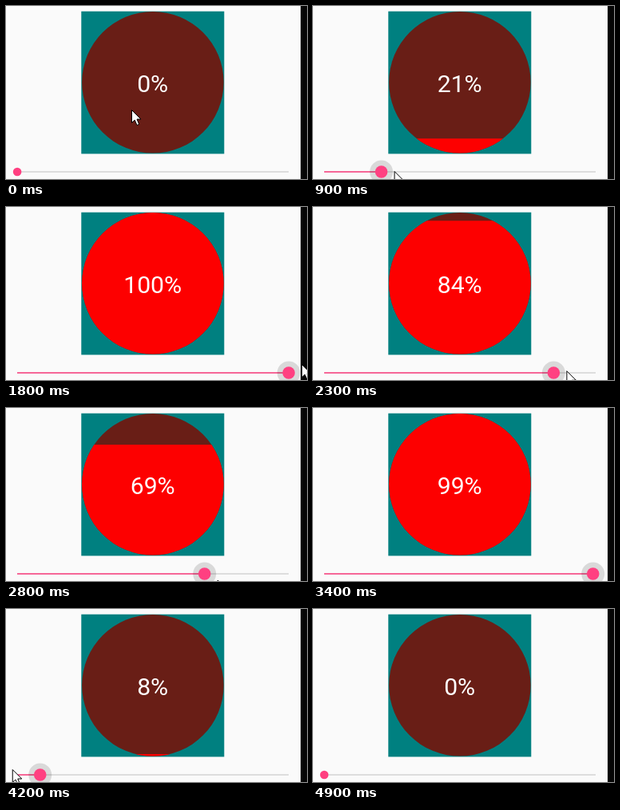
An HTML page for the animation above (5.2 s loop, 377x217 px).

```html
<!DOCTYPE html>
<html lang="en">
<head>
<meta charset="utf-8">
<title>Circular fill slider</title>
<style>
  html, body { margin: 0; width: 100%; height: 100%; overflow: hidden; background: #fafafa; }
  svg { display: block; width: 377px; height: 217px; }
  text { font: 30.2px Roboto, sans-serif; fill: #fff; text-anchor: middle; }
</style>
</head>
<body>
<svg viewBox="0 0 377 217">
  <clipPath id="fill"><rect id="level" x="94" width="180" height="180"/></clipPath>
  <rect width="377" height="217" fill="#fafafa"/>
  <rect x="369" width="8" height="217" fill="#050505"/>
  <rect x="94.3" y="6.7" width="179" height="178.7" fill="#008080"/>
  <circle cx="183.9" cy="95.8" r="88.8" fill="#691e16"/>
  <circle cx="183.9" cy="95.8" r="88.8" fill="#fd0000" clip-path="url(#fill)"/>
  <text id="label" x="183.7" y="107.8"></text>
  <path d="M14 208H354" stroke="#d3d3d3" stroke-width="1.5"/>
  <path id="track" stroke="#ff4081" stroke-width="1.5"/>
  <circle id="halo" cy="208" r="14.5" fill="#000"/>
  <circle id="thumb" cy="208" fill="#ff4081"/>
  <path id="cursor" d="M.5 .5V16.5L4.2 13L7 19.5L9.7 18.3L7 12H12Z" fill="#fff" stroke="#000"/>
</svg>
<script>
const LOOP = 5200, STEP = 100;
const GRAB = 700, RELEASE = 4400, FADE = 500;

// Turning points of the drag: [time, percent]
const drag = [
  [697, 0], [1200, 52.1], [1800, 100], [2000, 100], [2600, 69],
  [2800, 69], [3420, 100], [3600, 100], [3900, 58.97], [4250, 0]
];

// The hand drifts below the stage and back: [time, y]
const drift = [[600, 198], [900, 207], [1200, 198], [1900, 197], [2800, 215.5], [3200, 226], [3900, 210], [4200, 201]];

const $ = id => document.getElementById(id);
const set = (id, attrs) => {
  for (const name in attrs) $(id).setAttribute(name, attrs[name]);
};
const clamp = v => Math.max(0, Math.min(1, v));

// Straight lines between points, held at both ends
function follow(points, t) {
  return points.slice(1).reduce((value, [time, next], i) => {
    const [from, previous] = points[i];
    return value + (next - previous) * clamp((t - from) / (time - from));
  }, points[0][1]);
}

function cursorAt(t, thumbX) {
  if (t < STEP) return [157, 130];
  if (t < GRAB) {
    const k = clamp((t - 200) / 200);
    return [3 + 12 * k, 193 + 5 * k];
  }
  const grip = t < 3500 ? 16 : -35;
  return [thumbX + grip, follow(drift, t)];
}

function draw(t) {
  const percent = follow(drag, t);
  const thumbX = 14.1 + 3.4 * percent;
  const press = t < GRAB ? 0 : clamp(1 - (t - RELEASE) / FADE);

  // The level's chord ends move along the circle at a rate set by the percentage.
  set('level', { y: 96 + 89 * Math.cos(Math.PI * percent / 100) });
  $('label').textContent = Math.floor(percent + 1e-6) + '%';
  set('track', { d: `M14 208H${thumbX}` });
  set('halo', { cx: thumbX, opacity: 0.13 * press });
  set('thumb', { cx: thumbX, r: 5.3 + 2.5 * press });
  set('cursor', { transform: `translate(${cursorAt(t, thumbX)})` });
}

const start = performance.now();
function frame() {
  const t = (performance.now() - start) % LOOP;
  draw(Math.floor(t / STEP) * STEP);
  requestAnimationFrame(frame);
}
frame();
</script>
</body>
</html>
```
